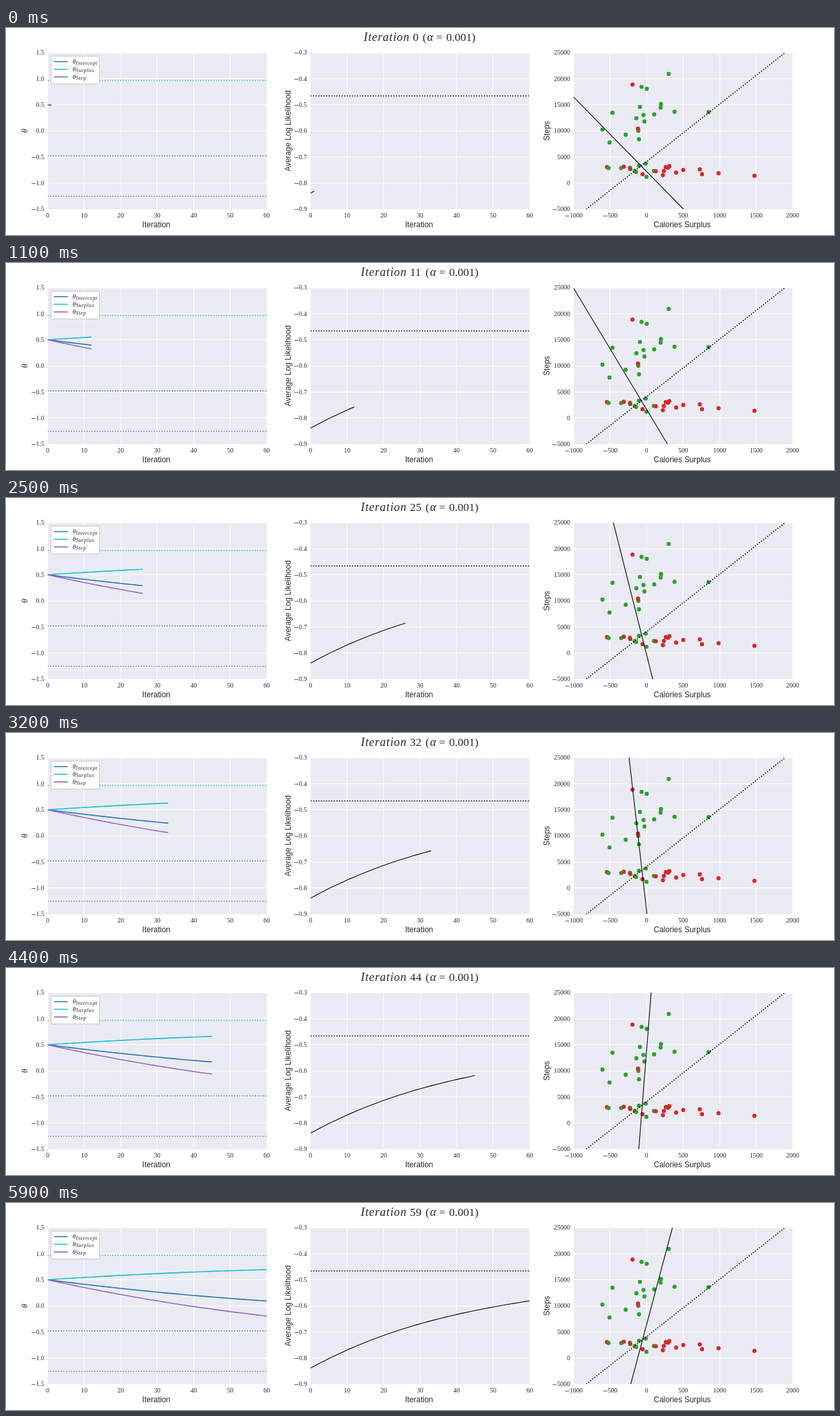
These frames come from a looping animation (1280x320 px, 6 s). An HTML page with a canvas:

```html
<!DOCTYPE html>
<html lang="en">
<head>
<meta charset="utf-8">
<title>Gradient ascent</title>
<style>
html, body { margin: 0; width: 100%; height: 100%; overflow: hidden; background: #fff; }
canvas { display: block; }
</style>
</head>
<body>
<canvas id="stage" width="1280" height="320"></canvas>
<script>
const ctx = document.getElementById('stage').getContext('2d');
const SERIF = '"Liberation Serif", serif', SANS = '"Liberation Sans", sans-serif';
const INK = '#262626', BLUE = '#1f77b4', CYAN = '#17becf', PURPLE = '#9467bd';
const GREEN = '#2ca02c', RED = '#d62728';
const TOP = 38, BOTTOM = 280, WIDTH = 338.6;
const LEFT = [64.5, 470.8, 877.5];

// Parameters and likelihood after n iterations
const intercept = n => 0.5 - n * (0.009 - 0.000037 * n);
const surplus = n => 0.5 + n * (0.00465 - 0.0000235 * n);
const step = n => 0.5 - n * (0.01565 - 0.000077 * n + 0.00000016 * n * n);
const likelihoodY = n => 255.3 - n * (3.092 - 0.0312 * n + 0.000143 * n * n);
const thetaY = v => 159 - v * 80.67;

const greens = [
  [922, 157], [933, 177], [937.5, 131], [958, 165], [974.5, 139.5], [977.5, 159], [978.5, 172],
  [980, 122], [982.5, 91], [985.5, 134.5], [987, 144.5], [990.5, 94], [1002, 133.5], [1012, 123],
  [1012.5, 117.5], [1024.5, 71], [1033.5, 129.5], [1086, 130], [931.5, 216.5], [951, 216.5],
  [964.5, 216], [972, 221], [974, 222.5], [978.5, 213], [989, 209.5], [990, 230], [1001.5, 221]];
const reds = [
  [968.5, 87.5], [977, 155.5], [955, 214.5], [965, 218], [984, 226], [1004.5, 221.5],
  [1015.5, 227.5], [1017, 221], [1020, 215], [1023.5, 216], [1025.5, 213.5], [1036, 223.5],
  [1047, 219.5], [1072.5, 218.5], [1076, 226], [1101.5, 224.5], [1157, 228.5]];

function line(points, color, width, dash = []) {
  ctx.strokeStyle = color;
  ctx.lineWidth = width;
  ctx.setLineDash(dash);
  ctx.beginPath();
  points.forEach(p => ctx.lineTo(...p));
  ctx.stroke();
  ctx.setLineDash([]);
}

const dotted = (x1, y1, x2, y2, color) => line([[x1, y1], [x2, y2]], color, 1.6, [1.6, 2.4]);

function curve(x, f, n, color, width) {
  line(Array.from({ length: n + 1 }, (_, i) => [x + i * WIDTH / 60, f(i)]), color, width);
}

function text(s, x, y, font, align = 'left', spacing = 0) {
  ctx.font = font;
  ctx.textAlign = align;
  ctx.letterSpacing = spacing + 'px';
  ctx.fillStyle = INK;
  ctx.fillText(s, x, y);
}

function upright(s, x, y, font) {
  ctx.save();
  ctx.translate(x, y);
  ctx.rotate(-Math.PI / 2);
  text(s, 0, 0, font, 'center');
  ctx.restore();
}

// Tick number with a long minus; anchor 0.5 centres it, 1 ends it at x
function tick(value, digits, x, y, anchor) {
  ctx.font = '10px ' + SERIF;
  ctx.letterSpacing = '0px';
  const s = Math.abs(value).toFixed(digits), sign = value < -1e-9 ? 7.8 : 0;
  const start = x - (ctx.measureText(s).width + sign) * anchor;
  text(s, start + sign, y + 3.4, ctx.font);
  if (sign) ctx.fillRect(start + 0.8, y + 0.4, 6.2, 0.8);
}

function axes(left, x0, dx, y0, dy, digits, label) {
  ctx.fillStyle = '#eaeaf2';
  ctx.fillRect(left, TOP, WIDTH, BOTTOM - TOP);
  for (let i = 0; i < 7; i++) {
    const x = left + i * WIDTH / 6, y = BOTTOM - i * (BOTTOM - TOP) / 6;
    const gx = Math.floor(x) + 0.5, gy = Math.floor(y) + 0.5;
    line([[gx, TOP], [gx, BOTTOM]], '#fff', 1);
    line([[left, gy], [left + WIDTH, gy]], '#fff', 1);
    tick(x0 + i * dx, 0, x, 290, 0.5);
    tick(y0 + i * dy, digits, left - 5.5, y, 1);
  }
  text(label, left + WIDTH / 2 - 1.5, 308, '12px ' + SANS, 'center');
}

function clipped(left, draw) {
  ctx.save();
  ctx.beginPath();
  ctx.rect(left, TOP, WIDTH, BOTTOM - TOP);
  ctx.clip();
  draw(left, left + WIDTH);
  ctx.restore();
}

function dot([x, y], color) {
  ctx.fillStyle = color;
  ctx.beginPath();
  ctx.arc(x, y, 3.2, 0, 7);
  ctx.fill();
}

function legend() {
  ctx.fillStyle = '#fff';
  ctx.strokeStyle = '#c4c4c8';
  ctx.lineWidth = 1;
  ctx.beginPath();
  ctx.roundRect(69.5, 43.5, 75, 43, 2);
  ctx.fill();
  ctx.stroke();
  [['Intercept', BLUE], ['Surplus', CYAN], ['Step', PURPLE]].forEach(([name, color], i) => {
    const y = 52 + i * 11.8;
    line([[74, y], [95.5, y]], color, 1.6);
    text('θ', 103, y + 3, 'italic 10px ' + SERIF);
    text(name, 108, y + 4.6, 'italic 8px ' + SERIF, 'left', 0.55);
  });
}

function title(n) {
  const s = String(n), x = 557.5 - 4.5 * s.length, end = x + 76 + 9 * s.length;
  const roman = '17.5px ' + SERIF, italic = 'italic 18px ' + SERIF;
  text('Iteration', x, 20, italic, 'left', 0.9);
  text(s, x + 76, 20, roman, 'left', 0.2);
  text('(', end + 6, 20, roman);
  text('α', end + 13, 20, italic);
  text('=', end + 27, 20, roman);
  text('0.001', end + 42.5, 20, roman);
  text(')', end + 82, 20, roman);
}

// Where θ0 + θ1·x + θ2·y = 0 on the standardised data
function boundaryX(n, y) {
  return 999.5 - (50.2 * intercept(n) + 0.98 * step(n) * (180 - y)) / surplus(n);
}

function draw(n) {
  ctx.fillStyle = '#fff';
  ctx.fillRect(0, 0, 1280, 320);
  title(n);

  axes(LEFT[0], 0, 10, -1.5, 0.5, 1, 'Iteration');
  upright('θ', 33, 159, 'italic 13px ' + SERIF);
  clipped(LEFT[0], (l, r) => {
    [[intercept, -0.48, BLUE], [surplus, 0.966, CYAN], [step, -1.255, PURPLE]].forEach(([f, goal, color]) => {
      dotted(l, thetaY(goal), r, thetaY(goal), color);
      curve(l, i => thetaY(f(i)), n + 1, color, 1.6);
    });
    legend();
  });

  axes(LEFT[1], 0, 10, -0.9, 0.1, 1, 'Iteration');
  upright('Average Log Likelihood', 440, 159, '12px ' + SANS);
  clipped(LEFT[1], (l, r) => {
    dotted(l, 105, r, 105, '#000');
    curve(l, likelihoodY, n + 1, '#000', 1.1);
  });

  axes(LEFT[2], -1000, 500, -5000, 5000, 0, 'Calories Surplus');
  upright('Steps', 840, 159, '12px ' + SANS);
  clipped(LEFT[2], () => {
    dot([929, 215], RED);
    greens.forEach(p => dot(p, GREEN));
    reds.forEach(p => dot(p, RED));
    dotted(897, BOTTOM, 1204.5, TOP, '#000');
    line([[boundaryX(n, TOP), TOP], [boundaryX(n, BOTTOM), BOTTOM]], '#000', 1.1);
  });
}

const start = performance.now();
function frame() {
  draw(Math.floor((performance.now() - start) % 6000 / 100));
  requestAnimationFrame(frame);
}
frame();
</script>
</body>
</html>
```
